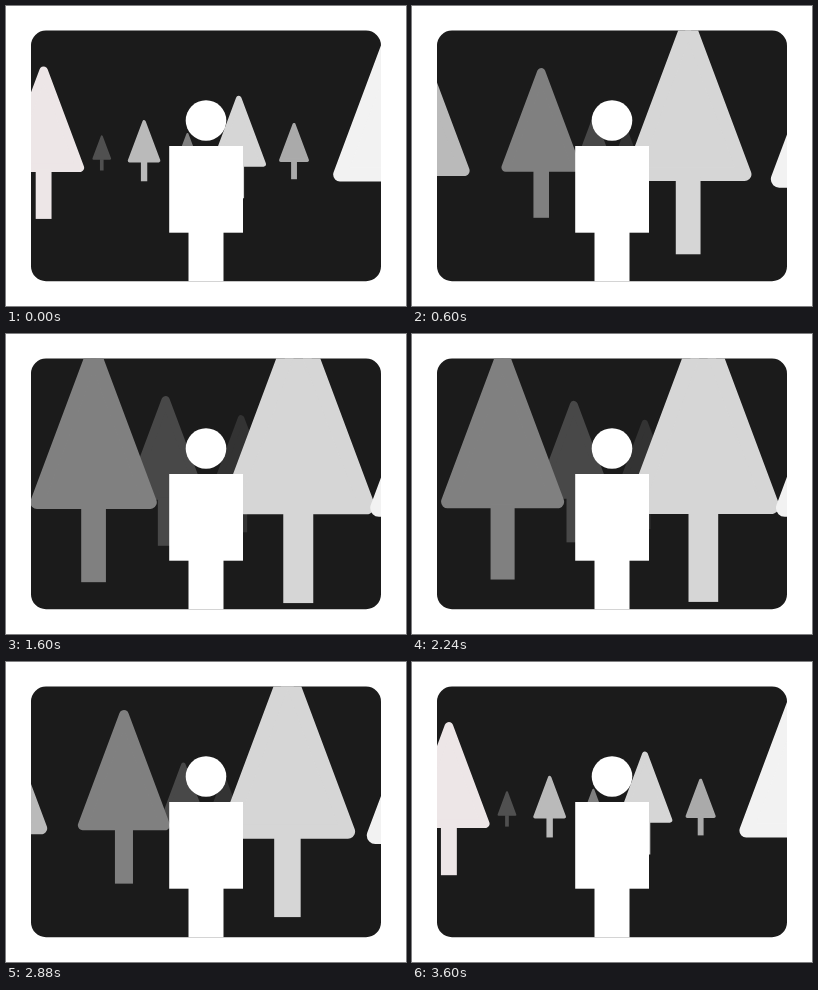
Write an HTML page that moves like this. It is 400 by 300 pixels and loops after 3640 ms.

```html
<!DOCTYPE html>
<html lang="en">
<head>
<meta charset="utf-8">
<title>Dolly zoom</title>
<style>
  html, body { margin: 0; width: 100%; height: 100%; overflow: hidden; background: #fff; }
  svg { display: block; width: 100vw; height: 100vh; }
</style>
</head>
<body>
<svg viewBox="0 0 400 300">
  <defs>
    <clipPath id="window"><rect x="25" y="24.6" width="350" height="250.6" rx="15"/></clipPath>
    <!-- One tree of height 1, measured from the horizon -->
    <g id="tree">
      <path d="M0-.56L.238.077H-.238Z" stroke-width=".056" stroke-linejoin="round"/>
      <rect x="-.052" y=".09" width=".104" height=".323" stroke="none"/>
    </g>
  </defs>
  <g clip-path="url(#window)">
    <rect width="400" height="300" fill="#1b1b1b"/>
    <g id="forest"></g>
    <g fill="#fff">
      <circle cx="200" cy="114.5" r="20.3"/>
      <rect x="163.2" y="140" width="73.8" height="86.7"/>
      <rect x="182.5" y="226" width="35" height="60"/>
    </g>
  </g>
</svg>
<script>
const PERIOD = 3640;
const PHASE = 12;
const NEAR = 0.476;        // camera distance to the figure at its closest
const TRAVEL = 10;
const FULL_HEIGHT = 316.7; // tree height at the figure's depth

// Far to near: depth behind the figure, sideways place in tree heights, colour
const trees = [
  [17.35, 0.3, '#333'],
  [11.35, -0.27, '#484848'],
  [3.83, -2.97, '#505050'],
  [3.376, -0.473, '#808080'],
  [2.21, 1.565, '#aaa'],
  [1.993, -1.012, '#bababa'],
  [1, 0.32, '#d6d6d6'],
  [0.515, -1.066, '#ede6e7'],
  [0.148, 0.792, '#f2f2f2'],
].map(([depth, side, color]) => {
  const node = document.createElementNS('http://www.w3.org/2000/svg', 'use');
  node.setAttribute('href', '#tree');
  node.setAttribute('fill', color);
  node.setAttribute('stroke', color);
  document.getElementById('forest').append(node);
  return { depth, side, node };
});

// The lens keeps the figure's size constant while the camera moves.
function draw(now) {
  const angle = 2 * Math.PI * (now + PHASE) / PERIOD;
  const distance = NEAR + TRAVEL * (1 - Math.cos(angle)) / 2;
  for (const { depth, side, node } of trees) {
    const height = FULL_HEIGHT / (1 + depth / distance);
    node.setAttribute('transform', `translate(${200 + side * height} 150) scale(${height})`);
  }
}

const start = performance.now();
function tick() {
  draw(performance.now() - start);
  requestAnimationFrame(tick);
}
draw(0);
requestAnimationFrame(tick);
</script>
</body>
</html>
```
